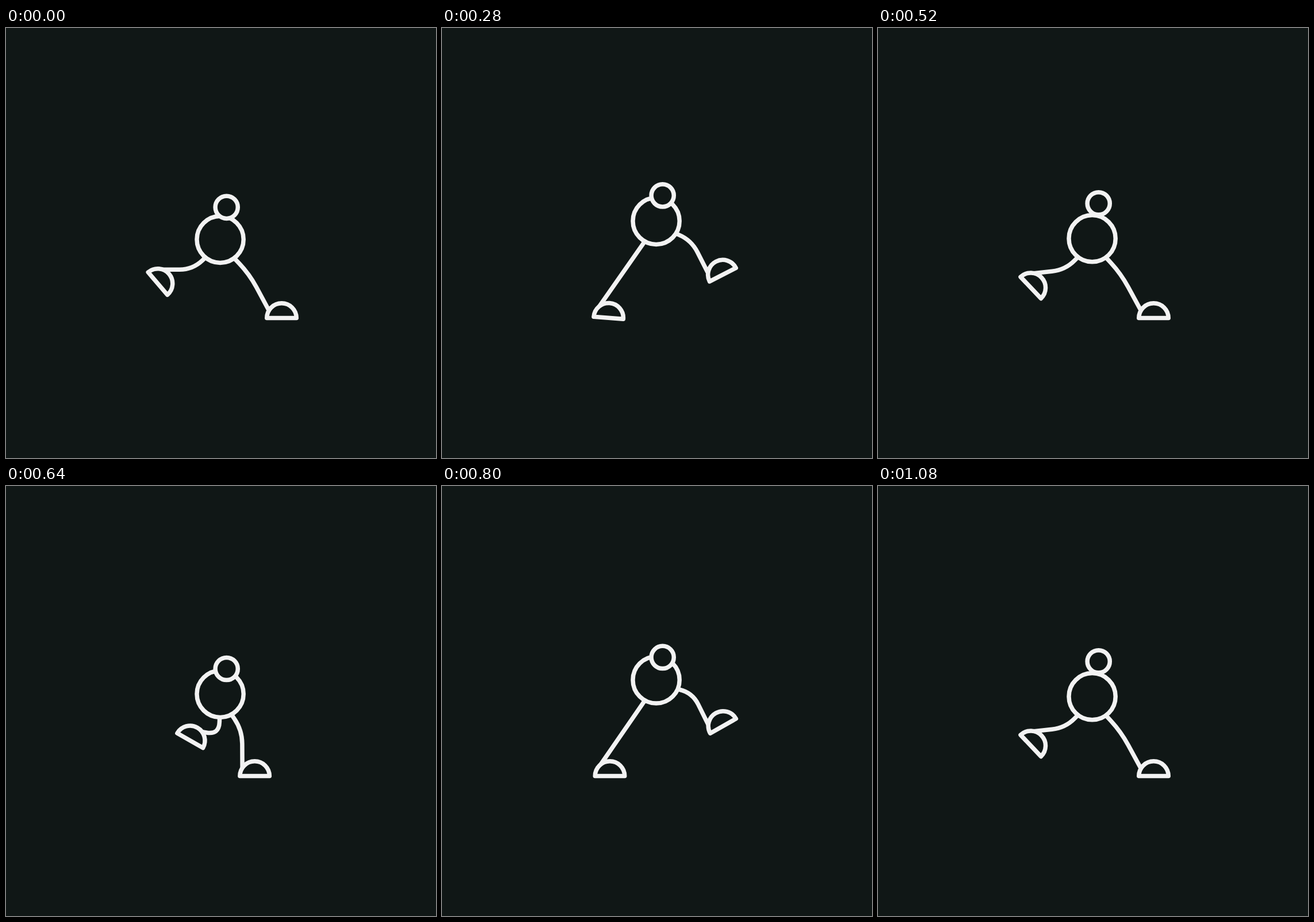
Recreate the animation shown at these times as an HTML page. Size 748 by 748 pixels, loop 1.12 s.

```html
<!DOCTYPE html>
<html lang="en">
<head>
<meta charset="utf-8">
<title>Walk cycle</title>
<style>
  html, body { margin: 0; width: 100%; height: 100%; overflow: hidden; background: #101716; }
  svg { display: block; width: 100vw; height: 100vh; }
  .line { fill: #101716; stroke: #f2f2f2; stroke-width: 7.5; stroke-linecap: round; stroke-linejoin: round; }
  .leg { fill: none; }
</style>
</head>
<body>
<svg viewBox="0 0 748 748">
  <g class="limb"><path class="line leg"/><path class="line foot" d="M-25.75 0A25.75 25.75 0 0 1 25.75 0Z"/></g>
  <g class="limb"><path class="line leg"/><path class="line foot" d="M-25.75 0A25.75 25.75 0 0 1 25.75 0Z"/></g>
  <circle class="line" id="body" cx="372.6" r="40.6"/>
  <circle class="line" id="head" cx="383.7" r="19.6"/>
</svg>
<script>
const LOOP = 1120, STEP = 40, HALF = LOOP / 2;
const GROUND = 504.5;
const HIP_X = 372.6, HIP_DROP = 7, REACH = 161;
const ANKLE = { x: -21.5, y: -12 };

// Key poses of one foot; ms leads to the next pose, lag delays the height
const land  = { x: 479.5, y: GROUND, tilt: 0, ms: 240, lag: 1 };
const push  = { x: 292, y: GROUND, tilt: 0, ms: 160, lag: 2 };
const peel  = { x: 276, y: 494, tilt: 29.5, ms: 160, lag: 1 };
const trail = { x: 264, y: 444.5, tilt: 49.5, ms: 240, lag: 2 };
const kick  = { x: 489, y: 417.5, tilt: -29.5, ms: 160, lag: 1 };
const drop  = { x: 485, y: 497, tilt: -14, ms: 120, lag: 1 };
const stride = [land, push, peel, trail, kick, drop, land];

const mix = (a, b, u) => a + (b - a) * u;
const ease = u => (1 - Math.cos(Math.PI * u)) / 2;
const wave = (time, mid, amp, peak) =>
  mid + amp * Math.cos((time - peak) / HALF * 2 * Math.PI);

function footAt(time) {
  let i = 0;
  while (i < stride.length - 1 && time >= stride[i].ms) time -= stride[i++].ms;
  const a = stride[i], b = stride[i + 1] || land;
  const u = ease(time / a.ms);
  // The last pose simply rests on the ground until the loop restarts
  if (i === stride.length - 1) return land;
  return {
    x: mix(a.x, b.x, u),
    y: mix(a.y, b.y, u ** a.lag),
    tilt: mix(a.tilt, b.tilt, u)
  };
}

function drawLimb(limb, time, hipY) {
  const { x, y, tilt } = footAt(time);
  const r = tilt * Math.PI / 180, c = Math.cos(r), s = Math.sin(r);
  const ax = x + ANKLE.x * c - ANKLE.y * s;
  const ay = y + ANKLE.x * s + ANKLE.y * c;

  // The knee bends forward as hip and ankle come closer
  const dx = ax - HIP_X, dy = ay - hipY, d = Math.hypot(dx, dy);
  const bend = Math.max(0, 0.63 * (REACH - d)) / d;
  const kx = (HIP_X + ax) / 2 + dy * bend;
  const ky = (hipY + ay) / 2 - dx * bend;

  const nearKnee = (px, py) => `${mix(kx, px, 0.35)} ${mix(ky, py, 0.35)}`;
  limb.querySelector('.leg').setAttribute('d',
    `M${HIP_X} ${hipY}L${nearKnee(HIP_X, hipY)}Q${kx} ${ky} ${nearKnee(ax, ay)}L${ax} ${ay}`);
  limb.querySelector('.foot').setAttribute('transform',
    `translate(${x} ${y}) rotate(${tilt})`);
}

const limbs = document.querySelectorAll('.limb');
const body = document.getElementById('body');
const head = document.getElementById('head');

function draw(now) {
  const time = Math.floor(now % LOOP / STEP) * STEP;
  const bodyY = wave(time, 351.8, 16, 0);
  body.setAttribute('cy', bodyY);
  head.setAttribute('cy', wave(time, 301.6, 16.4, 80));
  limbs.forEach((limb, i) => drawLimb(limb, (time + i * HALF) % LOOP, bodyY + HIP_DROP));
}

const start = performance.now();
function tick() {
  draw(performance.now() - start);
  requestAnimationFrame(tick);
}
tick();
</script>
</body>
</html>
```
